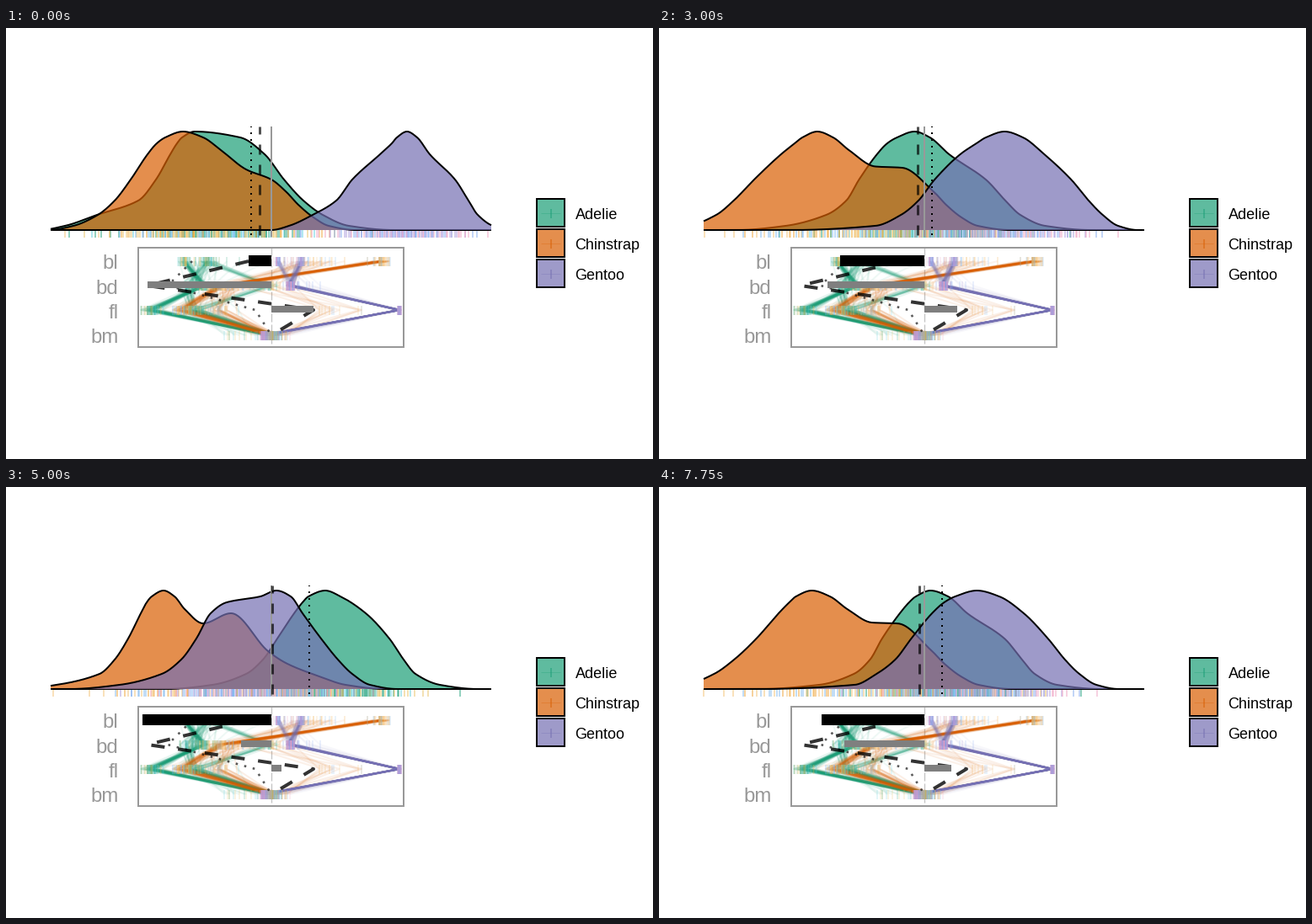
Write a matplotlib script that moves like this. It is 768 by 512 pixels and loops after 8000 ms.

```python
import numpy as np
import matplotlib.pyplot as plt
from matplotlib.animation import FuncAnimation
from matplotlib.collections import LineCollection
from matplotlib.patches import Polygon, Rectangle

W, H, DPI = 768, 512, 100
PX = 72 / DPI
FRAMES, INTERVAL = 32, 250
MID, BASE, HALF = 315, 240, 157.5
ROWS = (277, 306, 335, 365)
rng = np.random.default_rng(7)

COLORS = {"Adelie": "#1B9E77", "Chinstrap": "#D95F02", "Gentoo": "#7570B3"}
COUNTS = {"Adelie": 146, "Chinstrap": 68, "Gentoo": 119}
TINTS = {
    "Adelie": ("#e8c060", "#5ccfe0", "#1B9E77"),
    "Chinstrap": ("#f0a030", "#f4c070", "#7fb8f0"),
    "Gentoo": ("#f0a0c0", "#80a8f0", "#a898dc"),
}

# Outline of each density: where it crosses a set of heights, per pose angle.
POSES = np.array([9.9, 30.5, 48.7, 76.2, 90])
LEFT = [240, 235, 222, 205, 180, 150, 137, 130, 123]
LEVELS = LEFT + [130, 150, 180, 205, 222, 235, 240]
ADELIE = np.array([
    [40, 70, 108, 157, 178, 195, 203, 209, 224, 278, 307, 330, 353, 376, 407, 460],
    [75, 118, 172, 200, 216, 237, 250, 265, 289, 304, 327, 368, 393, 413, 445, 500],
    [115, 187, 228, 247, 261, 282, 293, 301, 318, 339, 361, 406, 427, 442, 468, 520],
    [190, 245, 285, 305, 322, 342, 352, 359, 379, 397, 427, 455, 472, 486, 515, 560],
    [235, 270, 315, 334, 347, 362, 371, 377, 395, 415, 452, 473, 486, 498, 519, 560],
])
GENTOO = np.array([
    [315, 336, 364, 392, 411, 444, 458, 464, 476, 488, 503, 533, 549, 560, 578, 600],
    [195, 275, 311, 330, 349, 384, 408, 419, 437, 453, 473, 507, 528, 544, 560, 580],
    [125, 240, 264, 286, 305, 330, 344, 355, 381, 408, 438, 467, 487, 504, 524, 550],
    [75, 135, 185, 208, 226, 243, 262, 302, 321, 338, 352, 374, 394, 411, 432, 465],
    [30, 95, 155, 180, 199, 217, 231, 274, 293, 306, 319, 339, 361, 377, 396, 422],
])
CHINSTRAP = np.array([
    [50, 80, 109, 129, 148, 168, 179, 189, 210, 234, 255, 285, 315, 333, 347, 365, 383, 415],
    [15, 47, 78, 95, 116, 152, 171, 181, 197, 212, 228, 260, 293, 328, 342, 360, 378, 415],
    [-15, 32, 64, 88, 115, 142, 155, 163, 182, 204, 225, 255, 285, 325, 339, 357, 377, 415],
    [15, 60, 111, 129, 145, 160, 167, 173, 187, 200, 212, 234, 267, 311, 334, 372, 403, 450],
    [10, 72, 130, 147, 161, 175, 182, 188, 203, 215, 226, 246, 278, 315, 332, 367, 392, 418],
])
DIPS = np.array([[168, 180], [168, 169], [161, 163], [162, 150], [163.5, 154]])

GRID = np.linspace(53, 576, 400)


def angle(n):
    """Angle of the tour, in degrees."""
    if n < 6:
        return 9.9
    if n < 24:
        return min(12.1 + 4.58 * (n - 6), 89.6)
    return 90 - 5.64 * (n - 24)


def spin(table, deg):
    """Rotate x positions around the middle between two poses."""
    k = int(np.clip(np.searchsorted(POSES, deg) - 1, 0, len(POSES) - 2))
    t0, t1, t = np.radians([POSES[k], POSES[k + 1], deg])
    a, b = np.sin(t1 - t), np.sin(t - t0)
    return MID + ((table[k] - MID) * a + (table[k + 1] - MID) * b) / np.sin(t1 - t0)


def heights(name, deg):
    if name != "Chinstrap":
        return np.array(LEVELS, float)
    dip, bump = (np.interp(deg, POSES, DIPS[:, i]) for i in (0, 1))
    return np.array(LEFT + [130, 145, dip, bump, 195, 210, 225, 235, 240], float)


def smooth(px, py, x):
    """Monotone cubic curve through the points."""
    h = np.diff(px)
    d = np.diff(py) / h
    m = np.zeros(len(px))
    same = d[:-1] * d[1:] > 0
    total = np.where(same, d[:-1] + d[1:], 1)
    m[1:-1] = np.where(same, 2 * d[:-1] * d[1:] / total, 0)
    x = np.clip(x, px[0], px[-1])
    k = np.clip(np.searchsorted(px, x) - 1, 0, len(h) - 1)
    s = (x - px[k]) / h[k]
    return ((1 + 2 * s) * (1 - s) ** 2 * py[k] + s * (1 - s) ** 2 * h[k] * m[k]
            + s * s * (3 - 2 * s) * py[k + 1] + s * s * (s - 1) * h[k] * m[k + 1])


def density(name, deg):
    px = spin(TABLES[name], deg)
    return np.minimum(smooth(px, heights(name, deg), GRID), BASE)


TABLES = {"Adelie": ADELIE, "Chinstrap": CHINSTRAP, "Gentoo": GENTOO}

fig = plt.figure(figsize=(W / DPI, H / DPI), dpi=DPI, facecolor="white")
ax = fig.add_axes([0, 0, 1, 1])
ax.set_xlim(0, W)
ax.set_ylim(H, 0)
ax.axis("off")


def line(xs, ys, color, width, z, dash=None, alpha=1):
    style = (0, tuple(d / width for d in dash)) if dash else "-"
    return ax.plot(xs, ys, color=color, lw=width * PX, ls=style, alpha=alpha,
                   zorder=z, solid_capstyle="butt", dash_capstyle="butt")[0]


def label(x, y, text, size, color, ha="left"):
    ax.text(x, y, text, fontsize=size * PX, color=color, ha=ha, va="baseline",
            family="Liberation Sans")


def pick(name, n):
    return [TINTS[name][i] for i in rng.integers(0, 3, n)]


# Legend
for i, (name, color) in enumerate(COLORS.items()):
    y = 203 + 36 * i
    ax.add_patch(Rectangle((630, y), 33, 33, fc=color, alpha=0.7, lw=0))
    line([635, 658], [y + 17] * 2, color, 1, 2, alpha=0.3)
    line([647] * 2, [y + 12, y + 23], color, 2, 2, alpha=0.5)
    ax.add_patch(Rectangle((630, y), 33, 33, fill=False, ec="black", lw=2 * PX))
    label(675.5, y + 24, name, 18, "black")

# Densities and rug
shapes, edges = {}, {}
for i, (name, color) in enumerate(COLORS.items()):
    shapes[name] = ax.add_patch(Polygon([[0, 0]], fc=color, alpha=0.7, lw=0, zorder=3 + i))
    edges[name] = line([], [], "black", 2, 3.5 + i)
ranks = {name: (np.arange(n) + rng.random(n)) / n for name, n in COUNTS.items()}
rug_colors = [c for name, n in COUNTS.items() for c in pick(name, n)]
rug = LineCollection([], colors=rug_colors, linewidths=1.7 * PX, alpha=0.55, zorder=2)
ax.add_collection(rug)

line([MID] * 2, [248, 117], "#999999", 2, 7)
dashed = line([], [], "black", 3, 8, (12, 12), 0.68)
dotted = line([], [], "black", 2, 8, (2, 6))

# Contribution panel: color, count, opacity, mean and spread on each row
GROUPS = [
    ("Adelie", 32, 0.12, (212, 235, 172, 315), (3, 3, 4, 3)),
    ("Adelie", 24, 0.12, (240, 217, 222, 316), (5, 6, 5, 4)),
    ("Adelie", 20, 0.10, (222, 228, 178, 314), (9, 7, 9, 5)),
    ("Adelie", 16, 0.10, (238, 312, 225, 318), (8, 5, 9, 4)),
    ("Adelie", 12, 0.07, (258, 232, 235, 275), (22, 16, 22, 14)),
    ("Chinstrap", 26, 0.13, (446, 256, 208, 315), (4, 4, 6, 3)),
    ("Chinstrap", 18, 0.10, (442, 262, 252, 316), (8, 8, 8, 4)),
    ("Chinstrap", 14, 0.08, (368, 272, 215, 318), (12, 14, 14, 8)),
    ("Chinstrap", 10, 0.09, (360, 315, 390, 320), (20, 18, 12, 9)),
    ("Gentoo", 40, 0.10, (350, 337, 467, 306), (2, 3, 1, 2)),
    ("Gentoo", 30, 0.06, (323, 338, 467, 307), (2, 4, 1, 3)),
    ("Gentoo", 8, 0.05, (335, 350, 467, 325), (12, 15, 1, 10)),
]
line([MID] * 2, [261, 379], "#c4c4c4", 1.3, 2, (10, 3))
for name, n, alpha, mean, spread in GROUPS:
    xs = np.clip(rng.normal(mean, spread, (n, 4)), 160, 469)
    paths = [np.column_stack([row, ROWS]) for row in xs]
    ax.add_collection(LineCollection(paths, colors=COLORS[name], linewidths=2 * PX,
                                     alpha=alpha, zorder=3))
    ticks = [[(x, y - 5), (x, y + 6)] for row in xs for x, y in zip(row, ROWS)]
    ax.add_collection(LineCollection(ticks, colors=pick(name, len(ticks)),
                                     linewidths=1.5 * PX, alpha=0.22, zorder=3.2))
line([288, 168, 365, MID], ROWS, "black", 4, 4, (16, 16), 0.8)
line([221, 192, 296, MID], ROWS, "black", 2.6, 4, (2.6, 7.8), 0.65)
bars = [ax.add_patch(Rectangle((MID, y), 0, h, fc=c, lw=0, zorder=5))
        for y, h, c in ((270, 13, "black"), (301, 8, "#7f7f7f"), (330, 8, "#7f7f7f"))]
ax.add_patch(Rectangle((157, 261), 315, 118, fill=False, ec="#999999", lw=2 * PX, zorder=6))
for i, name in enumerate(("bl", "bd", "fl", "bm")):
    label(133.5, 286.5 + 29.3 * i, name, 24, "#999999", "right")


def draw(n):
    deg = angle(n)
    s, c = np.sin(np.radians(deg)), np.cos(np.radians(deg))
    segments = []
    for name in COLORS:
        y = density(name, deg)
        outline = np.column_stack([GRID, y])
        shapes[name].set_xy(np.vstack([outline, [576, BASE], [53, BASE]]))
        edges[name].set_data(GRID, y)
        mass = np.cumsum(BASE - y + 1e-6)
        xs = np.interp(ranks[name], mass / mass[-1], GRID)
        segments += [[(x, BASE), (x, 249)] for x in xs]
    rug.set_segments(segments)
    dashed.set_data([MID + 4.5 * s - 14.5 * c] * 2, [246, 117])
    dotted.set_data([MID + 55 * s - 34 * c] * 2, [246, 117])
    for bar, width in zip(bars, (-HALF * s, -149.2 * c, 50.8 * c)):
        bar.set_width(width)
    return []


anim = FuncAnimation(fig, draw, frames=FRAMES, interval=INTERVAL, repeat=True,
                     repeat_delay=0, blit=False)
plt.show()
```
